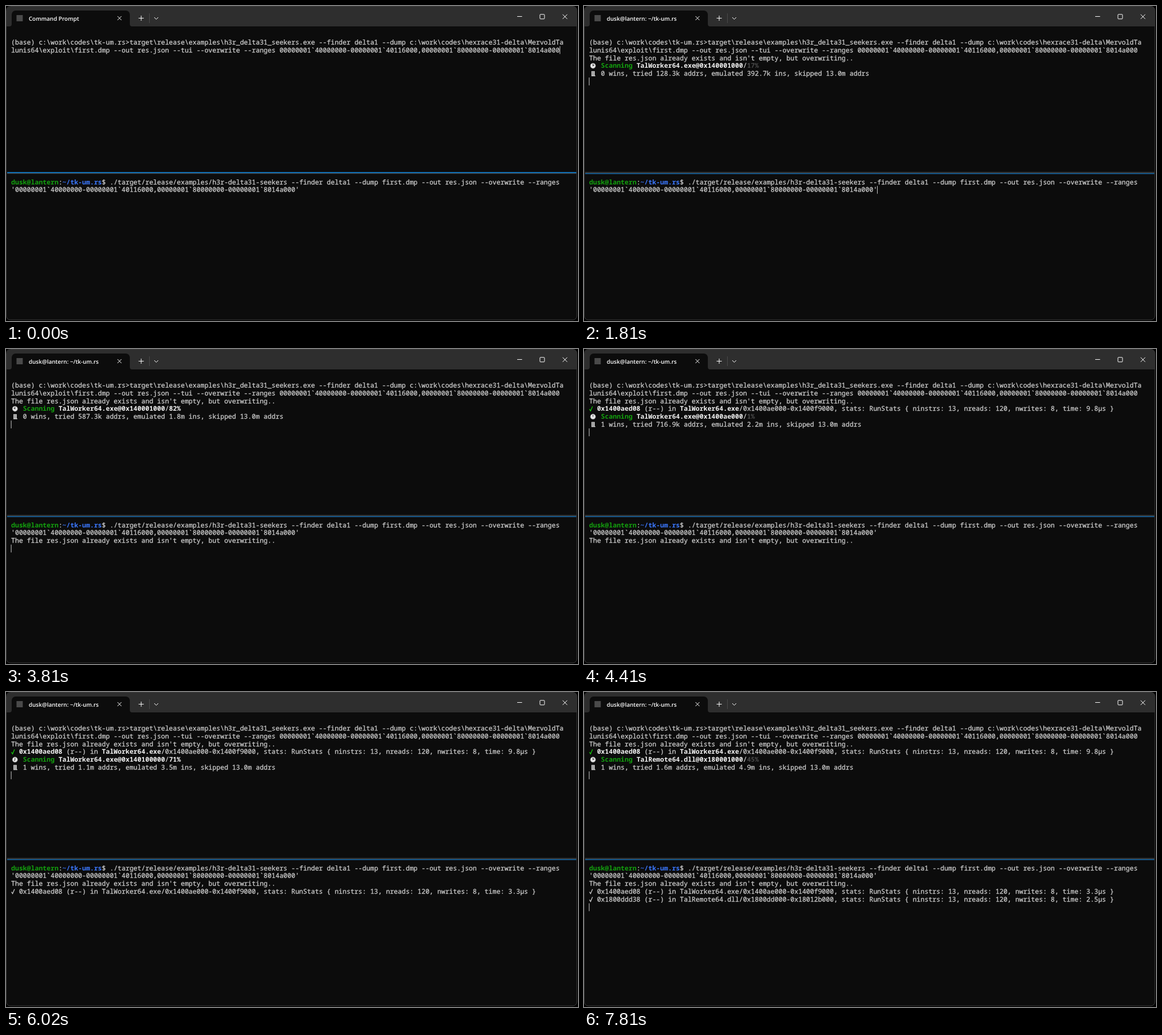
These frames come from a looping animation (1007 px wide and 556 px high, 8000 ms). An HTML page:

```html
<!DOCTYPE html>
<html lang="en">
<head>
<meta charset="utf-8">
<title>Terminal</title>
<style>
  html, body { margin: 0; width: 100%; height: 100%; overflow: hidden; background: #000; }
  svg { display: block; }
  text { white-space: pre; text-rendering: geometricPrecision; font-variant-ligatures: none; }
  .mono { font: 500 11.583px "Noto Sans Mono", "DejaVu Sans Mono", monospace; fill: #ccc; stroke: #ccc; stroke-width: .3; }
  .title { font: 600 10px "Open Sans", "Noto Sans", sans-serif; fill: #fff; }
  .bold, .green, .blue, .dim { font-weight: 700; stroke: none; }
  .bold { fill: #f2f2f2; }
  .green { fill: #13a10e; }
  .blue { fill: #3b78ff; }
  .dim { fill: #484848; }
  .line { fill: none; stroke: #fff; stroke-width: 1; }
</style>
</head>
<body>
<svg width="1007" height="556" viewBox="0 0 1007 556">
  <rect x=".5" y=".5" width="1004.5" height="553.5" rx="7" fill="#0c0c0c"/>
  <path d="M1 36V8a7 7 0 0 1 7-7H998a7 7 0 0 1 7 7V36Z" fill="#2e2e2e"/>
  <path d="M6 36q4 0 4-4V15a7 7 0 0 1 7-7H211a7 7 0 0 1 7 7V32q0 4 4 4Z" fill="#0c0c0c"/>
  <rect x=".5" y=".5" width="1004.5" height="553.5" rx="7" fill="none" stroke="#3d3d3d"/>
  <rect x="18.5" y="16" width="11" height="11" fill="#4a4a4a"/>
  <path class="line" d="M196.3 18l7 7m0-7l-7 7M233.5 21.5h9M238 17v9M261 20l3.5 3.5 3.5-3.5"/>
  <path class="line" d="M900 18.5h8.5M980 14.8l8 8m0-8l-8 8"/>
  <rect class="line" x="940" y="14.8" width="8" height="8" rx="1"/>
  <path d="M252.5 13v17" stroke="#4a4a4a"/>
  <clipPath id="tab"><rect x="40" y="8" width="143.5" height="28"/></clipPath>
  <g id="live"></g>
</svg>
<script>
const LOOP = 8000, CELL = 6.95, ROW = 13.85, LEFT = 9;
const TOP = 57, BOTTOM = 303.7;

// Moments at which the terminals repaint.
const STEPS = [0, 600, 1000, 1400, 1600, 1810, 2210, 2410, 2610, 2810,
  3210, 3410, 3610, 3810, 4010, 4210, 4410, 4610, 4810, 5020,
  5420, 5620, 5820, 6020, 6420, 6620, 6820, 7030, 7410, 7610, 7810];
const SCAN_START = 1400, FOCUS_SWAP = 1810, SECOND_RUN = 2610, FIRST_WIN = 4410;
const BLINK_ONLY = 4210;

// Time, addresses tried, instructions emulated.
const PROGRESS = [[1400, 1, 4], [1810, 128300, 392700], [2810, 371400, 1137000],
  [4410, 716900, 2210000], [6020, 1112600, 3480000], [7810, 1554500, 4900000]];

const EXE = 'TalWorker64.exe', DLL = 'TalRemote64.dll';
const SECTIONS = [[EXE, 0x140000000, 0x1000], [EXE, 0x140001000, 0xad000],
  [EXE, 0x1400ae000, 0x4b000], [EXE, 0x1400f9000, 0x7000], [EXE, 0x140100000, 0x16000],
  [DLL, 0x180000000, 0x1000], [DLL, 0x180001000, 0xdc000]];

const RANGES = '00000001`40000000-00000001`40116000,00000001`80000000-00000001`8014a000';
const NOTICE = "The file res.json already exists and isn't empty, but overwriting..";
const COMMAND = [
  String.raw`(base) c:\work\codes\tk-um.rs&gt;target\release\examples\h3r_delta31_seekers.exe --finder delta1 --dump c:\work\codes\hexrace31-delta\MervoldTa`,
  String.raw`lunis64\exploit\first.dmp --out res.json --tui --overwrite --ranges ` + RANGES];

const span = (style, s) => `<tspan class="${style}">${s}</tspan>`;
const hex = n => '0x' + n.toString(16);
const text = (top, row, s, col = 0) =>
  `<text class="mono" x="${LEFT + col * CELL}" y="${top + row * ROW + 10.9}">${s}</text>`;
const cursor = (top, row, col = 0) =>
  `<rect x="${LEFT - .4 + col * CELL}" y="${top + row * ROW}" width="1" height="${ROW}" fill="#ccc"/>`;

const SHELL = span('green', 'dusk@lantern') + ':' + span('blue', '~/tk-um.rs') +
  '$ ./target/release/examples/h3r-delta31-seekers --finder delta1 --dump first.dmp --out res.json --overwrite --ranges';

function count(n) {
  if (n >= 1e6) return (n / 1e6).toFixed(1) + 'm';
  if (n >= 1e3) return (n / 1e3).toFixed(1) + 'k';
  return n.toFixed(1);
}

function progress(t) {
  const i = Math.max(1, PROGRESS.findIndex(p => p[0] >= t));
  const [a, b] = [PROGRESS[i - 1], PROGRESS[i]];
  const k = (t - a[0]) / (b[0] - a[0]);
  return [1, 2].map(j => a[j] + (b[j] - a[j]) * k);
}

function section(tried) {
  let left = tried;
  for (const [name, start, size] of SECTIONS) {
    if (left < size) return { name, start, percent: Math.floor(left / size * 100) };
    left -= size;
  }
}

function win(top, row, [addr, name, from, to, time], styled) {
  const y = top + row * ROW, strong = s => styled ? span('bold', s) : s;
  return `<path d="M9.6 ${y + 7.5}l2 3.2 3.4-8" fill="none" stroke="${styled ? '#16c60c' : '#ccc'}" stroke-width="1.3"/>` +
    text(top, row, `${strong(hex(addr))} (r--) in ${strong(name)}/${hex(from)}-${hex(to)}, ` +
      `stats: RunStats { ninstrs: 13, nreads: 120, nwrites: 8, time: ${time}µs }`, 2);
}
const exeWin = time => [0x1400aed08, EXE, 0x1400ae000, 0x1400f9000, time];
const dllWin = time => [0x1800ddd38, DLL, 0x1800dd000, 0x18012b000, time];

function clock(row, hour) {
  const a = hour * Math.PI / 6, y = TOP + row * ROW + 7;
  return `<circle cx="15.8" cy="${y}" r="4.6" fill="#e6e6e6" stroke="#888" stroke-width=".6"/>` +
    `<path d="M15.8 ${y - 3.2}V${y}l${2.5 * Math.sin(a)} ${-2.5 * Math.cos(a)}" fill="none" stroke="#333" stroke-width="1.1"/>`;
}

function scroll(row) {
  const y = TOP + row * ROW + 2.5;
  return `<path d="M13 ${y}h6v7.5h1v1.5h-7Z" fill="#bbb"/>` +
    `<path d="M14 ${y + 2}h3.6m-3.6 2h3.6m-3.6 2h3.6" stroke="#777" stroke-width=".8"/>`;
}

function status(t, row, won) {
  const [tried, emulated] = progress(t);
  const { name, start, percent } = section(tried);
  const ticks = STEPS.filter(s => s > SCAN_START && s <= t && s !== BLINK_ONLY).length;
  return clock(row, ticks) + scroll(row + 1) +
    text(TOP, row, `${span('green', 'Scanning')} ${span('bold', `${name}@${hex(start)}`)}/` +
      span(percent < 50 ? 'dim' : 'bold', percent + '%'), 3) +
    text(TOP, row + 1, `${won} wins, tried ${count(tried)} addrs, emulated ${count(emulated)} ins, skipped 13.0m addrs`, 3) +
    cursor(TOP, row + 2);
}

function upperPane(t) {
  let out = COMMAND.map((s, i) => text(TOP, i, s)).join('');
  if (t < 600) return out + cursor(TOP, 1, 139);
  if (t < 1000) return out;
  out += text(TOP, 2, NOTICE);
  if (t < SCAN_START) return out + cursor(TOP, 3);
  const won = t >= FIRST_WIN ? 1 : 0;
  if (won) out += win(TOP, 3, exeWin('9.8'), true);
  return out + status(t, 3 + won, won);
}

function lowerPane(t) {
  const rows = [text(BOTTOM, 0, SHELL), text(BOTTOM, 1, `'${RANGES}'`)];
  if (t >= SECOND_RUN) rows.push(text(BOTTOM, 2, NOTICE));
  if (t >= 4610) rows.push(win(BOTTOM, 3, exeWin('3.3')));
  if (t >= 7610) rows.push(win(BOTTOM, 4, dllWin('2.5')));
  const phase = t < 4610 ? SECOND_RUN : 5290;
  const lit = t < SECOND_RUN || Math.floor((t - phase) / 530) % 2 === 0;
  if (t >= FOCUS_SWAP && lit)
    rows.push(t < SECOND_RUN ? cursor(BOTTOM, 1, 73) : cursor(BOTTOM, rows.length));
  return rows.join('');
}

function divider(t) {
  const bar = (y, h, fill) => `<rect x="2" y="${y}" width="1002" height="${h}" fill="${fill}"/>`;
  return t < FOCUS_SWAP
    ? bar(293, 2, '#0f6fb5') + bar(295, 1.2, '#444')
    : bar(293, 1.4, '#444') + bar(295, 1.5, '#1a6fb0');
}

function title(t) {
  const s = t < 1000 ? 'Command Prompt'
    : t < FOCUS_SWAP ? String.raw`Command Prompt - target\re`
    : 'dusk@lantern: ~/tk-um.rs';
  return `<text class="title" x="40" y="25.7" clip-path="url(#tab)">${s}</text>`;
}

const live = document.getElementById('live');
let shown = -1;
function frame(now) {
  const time = now % LOOP;
  const t = STEPS.filter(s => s <= time).pop();
  if (t !== shown) {
    shown = t;
    live.innerHTML = title(t) + divider(t) + upperPane(t) + lowerPane(t);
  }
  requestAnimationFrame(frame);
}
frame(performance.now());
</script>
</body>
</html>
```
